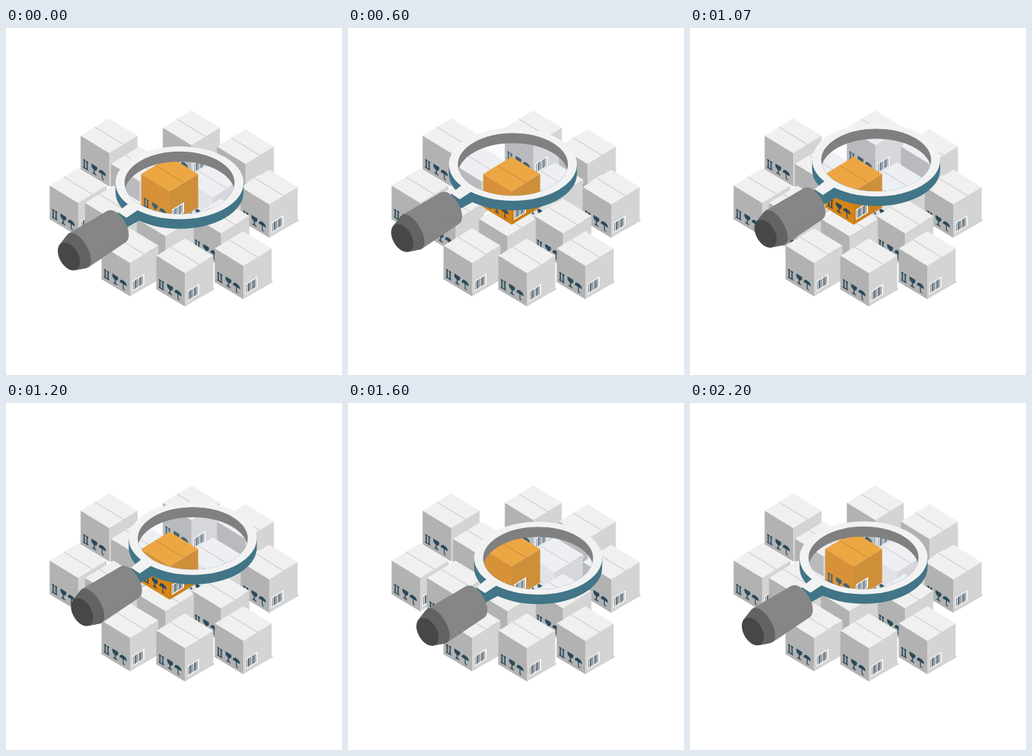
Animation of 466x480 px, one loop 2270 ms. Source, as an HTML page with a canvas:

```html
<!DOCTYPE html>
<html lang="en">
<head>
<meta charset="utf-8">
<title>Parcel search</title>
<style>
html, body { margin: 0; width: 100%; height: 100%; overflow: hidden; background: #fff; }
canvas { display: block; }
</style>
</head>
<body>
<canvas id="stage" width="466" height="480"></canvas>
<script>
const ctx = document.getElementById('stage').getContext('2d');
const LOOP = 2270, FPS = 15, STEPS = 34;
const INK = '#28485a', TEAL = '#417587', WHITE = '#f2f2f2';
const GREY = { top: '#f0f0f0', left: '#b2b2b2', right: '#d4d4d4', seam: '#c2c2c2', base: '#c6c6c6' };
const PALE = { ...GREY, left: '#e2e2e2' };
const ORANGE = { top: '#ee9c24', left: '#d68418', right: '#cc8018', seam: '#bd7a1c', base: '#d0cbc4' };

// parcel size: half width, half depth, height
const W = 39.5, D = 24, H = 46;

// back corner of each parcel, far to near
const parcels = [
  [257, 114], [143, 125], [332, 140], [185, 164], [287, 186, PALE], [100, 194], [365, 196],
  [149, 218], [298, 236], [221, 240], [227, 178, ORANGE], [172, 277], [329, 281], [248, 291]
];

// turning points of the magnifier: step, x, y
const turns = [[0, 0, 0.5], [9, -12, -25], [16, 17.5, -31], [24, 23, 1], [33, 0, 0.5]];

const lerp = (a, b, k) => a + (b - a) * k;

function poly(g, color, ...pts) {
  g.fillStyle = color;
  g.beginPath();
  for (let i = 0; i < pts.length; i += 2) g.lineTo(pts[i], pts[i + 1]);
  g.closePath();
  g.fill();
}

function drawMarks(g) {
  const bar = (u, v, w, h) => g.fillRect(u - w / 2, v, w, h);
  const dome = (u, v, r, flip) => {
    g.beginPath();
    g.arc(u, v, r, flip ? 0 : Math.PI, flip ? Math.PI : 0);
    g.fill();
  };
  g.fillStyle = INK;
  // arrows
  for (const u of [5, 9]) {
    bar(u, 30, 1.8, 11);
    bar(u, 30, 3.2, 1.5);
  }
  bar(7, 40.5, 7.5, 1.5);
  // glass
  bar(19, 29.5, 8, 3);
  dome(19, 32, 4, true);
  bar(19, 35, 1.6, 6);
  bar(19, 40.5, 5.5, 1.5);
  // umbrella
  dome(30, 35, 5);
  bar(30, 35, 1.2, 7);
  bar(31, 41, 3, 1.2);
}

function drawLabel(g) {
  g.fillStyle = '#f7f7f7';
  g.fillRect(3, 27, 17, 14.5);
  g.fillStyle = '#4a5964';
  for (let i = 0; i < 7; i++) g.fillRect(4.3 + i * 2.1, 28.5, 0.8 + (i * 5 % 3) * 0.4, 11.5);
}

function drawParcel(g, x, y, c = GREY) {
  g.save();
  g.translate(x, y);
  poly(g, c.base, -W - 1, D + H, 0, 2 * D + H, W + 2, D + H, 0, 2 * D);
  poly(g, c.top, 0, 0, W, D, 0, 2 * D, -W, D);
  poly(g, c.left, -W, D, 0, 2 * D, 0, 2 * D + H, -W, D + H);
  poly(g, c.right, 0, 2 * D, W, D, W, D + H, 0, 2 * D + H);
  g.strokeStyle = c.seam;
  g.beginPath();
  g.moveTo(-W / 2, D / 2);
  g.lineTo(W / 2, D * 1.5);
  g.stroke();
  g.save();
  g.transform(1, D / W, 0, 1, -W, D);
  drawMarks(g);
  g.restore();
  g.transform(1, -D / W, 0, 1, 0, 2 * D);
  drawLabel(g);
  g.restore();
}

const scene = document.createElement('canvas');
scene.width = 466;
scene.height = 480;
const sg = scene.getContext('2d');
sg.fillStyle = '#fff';
sg.fillRect(0, 0, 466, 480);
for (const p of parcels) drawParcel(sg, ...p);

// magnifier ring: centre, outer and inner radius, vertical squash, heights
const CX = 240.7, CY = 213.6, R = 88.8, R_IN = 76.3, FLAT = 0.568, RIM = 13.2, DEPTH = 14;

function oval(r, dy = 0) {
  const p = new Path2D();
  p.ellipse(CX, CY + dy, r, r * FLAT, 0, 0, Math.PI * 2);
  return p;
}

function join(...parts) {
  const p = new Path2D();
  parts.forEach(q => p.addPath(q));
  return p;
}

const all = new Path2D();
all.rect(0, 0, 466, 480);
const wall = new Path2D();
wall.rect(CX - R, CY, 2 * R, RIM);
const outer = oval(R), inner = oval(R_IN), glass = oval(R_IN, DEPTH);
const side = join(oval(R, RIM), wall);

function fill(color, shape, rule = 'nonzero') {
  ctx.fillStyle = color;
  ctx.fill(shape, rule);
}

function drawLens() {
  ctx.save();
  ctx.clip(inner);
  fill('rgba(220, 233, 250, 0.14)', glass);
  fill('#808080', join(all, glass), 'evenodd');
  ctx.restore();

  ctx.save();
  ctx.clip(join(all, inner), 'evenodd');
  fill(TEAL, side);
  poly(ctx, TEAL, 155, 254, 188, 247, 188, 264, 168, 275, 155, 266);
  fill(WHITE, outer);
  poly(ctx, WHITE, 174, 239, 188, 248, 167, 262, 155, 254);
  ctx.restore();
}

// ellipses swept from the neck down to the end cap
function drawHandle() {
  for (let i = 80; i >= 0; i--) {
    const s = i / 80;
    const r = s < 0.2 ? 21 + 30 * s : 27.5 - 2.5 * s;
    ctx.fillStyle = s > 0.2 ? '#868686' : i ? '#636363' : '#474747';
    ctx.beginPath();
    ctx.ellipse(lerp(87.2, 153.5, s), lerp(315.5, 274, s), r, 13, Math.PI / 3, 0, Math.PI * 2);
    ctx.fill();
  }
}

function position(step) {
  const i = turns.findIndex(p => p[0] > step);
  if (i < 0) return turns[0].slice(1);
  const [s0, x0, y0] = turns[i - 1], [s1, x1, y1] = turns[i];
  const k = (1 - Math.cos(Math.PI * (step - s0) / (s1 - s0))) / 2;
  return [lerp(x0, x1, k), lerp(y0, y1, k)];
}

const start = performance.now();
function frame() {
  const t = Math.max(0, performance.now() - start) % LOOP;
  const step = Math.floor(t * FPS / 1000 + 0.05) % STEPS;
  ctx.drawImage(scene, 0, 0);
  ctx.save();
  ctx.translate(...position(step));
  drawLens();
  drawHandle();
  ctx.restore();
  requestAnimationFrame(frame);
}
frame();
</script>
</body>
</html>
```
